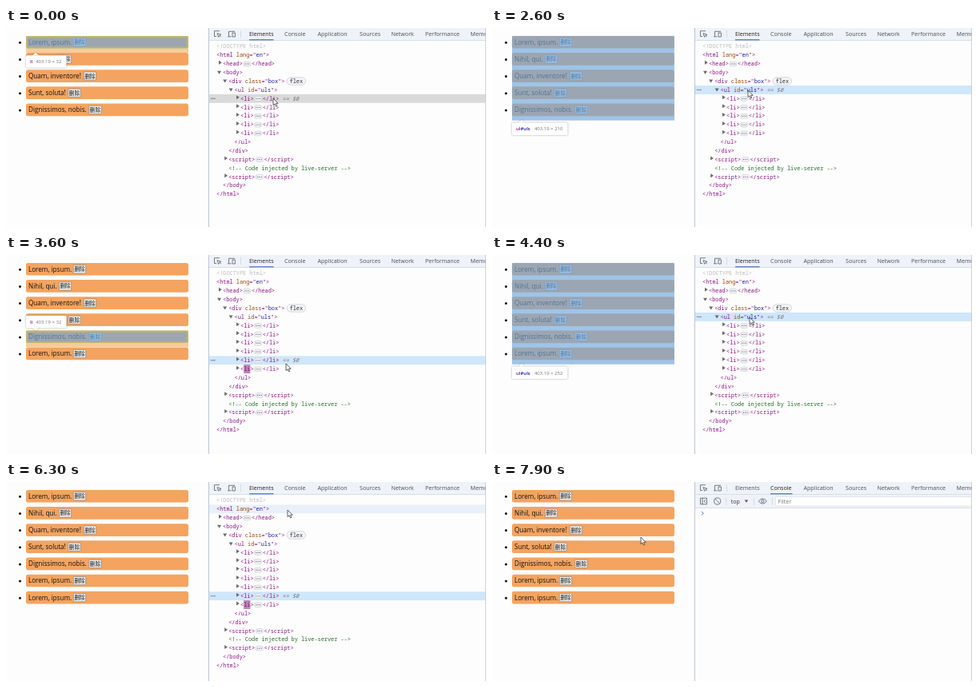
Write an HTML page that moves like this. It is 600 px wide and 249 px high and loops after 8 s.

```html
<!DOCTYPE html>
<html lang="en">
<head>
<meta charset="utf-8">
<title>Copying list items in the element tree</title>
<style>
html, body { margin: 0; width: 100%; height: 100%; overflow: hidden; background: #fefdfe; }
svg { display: block; width: 600px; height: 249px; }
text { white-space: pre; }
.page { font: 8.15px "Open Sans", "Noto Sans", sans-serif; fill: #111; }
.btn { font: 6.7px "Noto Sans CJK SC", "Noto Sans CJK", sans-serif; fill: #111; }
.ui { font: 7.1px "Open Sans", "Noto Sans", sans-serif; fill: #4b4f55; }
.tip { font: 6px "Open Sans", "Noto Sans", sans-serif; fill: #737373; }
.code { font: 6.89px "Noto Sans Mono", "DejaVu Sans Mono", monospace; fill: #881280; }
.code .attr { fill: #994500; }
.code .val { fill: #1a1aa6; }
.code .type { fill: #bdbdbd; }
.code .note { fill: #236e25; }
.code .ref { fill: #777; font-style: italic; }
.line { fill: none; stroke: #565b61; stroke-width: .8; }
</style>
</head>
<body>
<svg viewBox="0 0 600 249">
  <g id="page"></g>
  <g id="tools"></g>
  <path id="cursor" d="M0 0V8.6L2 6.8L3.4 9.9L4.8 9.3L3.5 6.3H6.1Z" fill="#fff" stroke="#222" stroke-width=".7"/>
</svg>
<script>
const LOOP = 8000, STEP = 100;
const CHAR = 4.134, ROW = 10.875, TOP = 17.6;
const ITEM = 21.15, FIRST = 9.9, LEFT = 25, WIDE = 203;
const $ = id => document.getElementById(id);

// [time, x, y] of the pointer tip
const PATH = [
  [0, 334, 88], [1300, 334, 88], [1700, 321, 78], [2000, 320, 78],
  [2600, 320, 78], [3000, 325, 77], [3200, 335, 96], [3500, 350, 136],
  [3600, 350, 136], [3800, 345, 100], [4000, 339, 56], [4300, 322, 78],
  [5200, 322, 78], [5500, 324, 76], [5800, 328, 75], [6000, 338, 68],
  [6300, 352, 35], [6400, 357, 29], [6500, 362, 19], [6800, 363, 9],
  [7200, 362, 9], [7500, 325, 38], [7800, 267, 79], [7900, 186, 69], [LOOP, 186, 69]
];

// [from, value]: the last entry already begun applies
const SELECTED = [[0, 'li0'], [1800, 'ul'], [2800, '/ul'], [3100, 'li4'],
  [4400, 'ul'], [5400, '/ul'], [5700, 'li5']];
const ITEMS = [[0, 5], [2800, 6], [5400, 7]];
const NODES = [[0, 5], [3100, 6], [5700, 7]];
const FLASH = [[0, 0], [3100, 1], [4400, 0], [5700, 1], [6900, 0]];
const OVERLAY = [[0, 1], [2800, 0], [3400, 1], [5400, 0], [6400, 1]];
const CONSOLE = [[0, 0], [7100, 1]];

const at = (list, t) => list.filter(e => e[0] <= t).pop()[1];

function pointer(t) {
  const i = PATH.findIndex(p => p[0] > t);
  const [t0, x0, y0] = PATH[i - 1], [t1, x1, y1] = PATH[i];
  const k = (t - t0) / (t1 - t0);
  return [x0 + (x1 - x0) * k, y0 + (y1 - y0) * k];
}

const esc = s => s.replace(/</g, '&lt;').replace(/>/g, '&gt;');
const rect = (x, y, w, h, fill, more = '') =>
  `<rect x="${x}" y="${y}" width="${w}" height="${h}" fill="${fill}" ${more}/>`;
const text = (cls, x, y, s, more = '') => `<text class="${cls}" x="${x}" y="${y}" ${more}>${s}</text>`;
const path = (d, more = 'class="line"') => `<path d="${d}" ${more}/>`;
const span = (cls, s) => `<tspan class="${cls}">${esc(s)}</tspan>`;

// Page

const WORDS = [['Lorem, ipsum.', 84], ['Nihil, qui.', 66], ['Quam, inventore!', 97],
  ['Sunt, soluta!', 77.5], ['Dignissimos, nobis.', 103.5]];

function item(i) {
  const y = FIRST + ITEM * i, [words, bx] = WORDS[i % 5 === i ? i : 0];
  return `<circle cx="17.5" cy="${y + 8.4}" r="1.5" fill="#111"/>` +
    rect(LEFT, y, WIDE, 15.7, '#f4a460', 'rx="2.5"') +
    text('page', 28, y + 10.7, words) +
    rect(bx + .3, y + 2.8, 15.4, 10.2, '#efefef', 'rx="1" stroke="#767676" stroke-width=".6"') +
    text('btn', bx + 1.3, y + 10.3, '删除');
}

const BLUE = 'rgba(111,168,220,.66)', GREEN = 'rgba(147,196,125,.55)', ORANGE = 'rgba(246,178,107,.66)';

function tip(x, y, w, down, name, id, size) {
  const ay = down ? y + 15.5 : y, d = down ? 3.5 : -3.5;
  const nameWidth = w - size.length * 3.3 - 9;
  return `<g filter="drop-shadow(0 .5px 1px rgba(0,0,0,.35))">` +
    rect(x, y, w, 15.5, '#fff', 'rx="1.2"') +
    path(`M${x + 8} ${ay}l4 ${d}l4 ${-d}z`, 'fill="#fff"') + '</g>' +
    text('tip', x + 5, y + 9.9, `<tspan fill="#881280" font-weight="600">${name}</tspan>` +
      `<tspan fill="#1a1aa6" font-weight="600">${id}</tspan>`) +
    text('tip', x + 7 + nameWidth, y + 9.9, size);
}

function overlay(id, count) {
  if (/^li/.test(id)) {
    const i = +id.slice(2), y = FIRST + ITEM * i, p = 2.3;
    const ring = `M${LEFT} ${y}h${WIDE}v16h${-WIDE}zM${LEFT + p} ${y + p}v${16 - 2 * p}h${WIDE - 2 * p}v${2 * p - 16}z`;
    return path(ring, `fill="${GREEN}"`) +
      rect(LEFT + p, y + p, WIDE - 2 * p, 16 - 2 * p, BLUE) +
      rect(LEFT, y + 16, WIDE, 5.1, ORANGE) +
      tip(LEFT, i ? y - 18.7 : y + 24.3, 50.5, i > 0, 'li', '', '403.19 × 32');
  }
  const h = ITEM * count;
  if (/ul$/.test(id))
    return rect(LEFT, FIRST, WIDE, h, BLUE) +
      tip(LEFT, FIRST + h + 2.8, 69.5, false, 'ul', '#uls', `403.19 × ${count * 42}`);
  if (/div$/.test(id))
    return rect(0, 0, 253, FIRST * 2 + h, BLUE) +
      rect(LEFT, FIRST, WIDE, h, ORANGE, 'opacity=".2"') +
      tip(2, FIRST * 2 + h + 3, 69.5, false, 'div', '.box', `502 × ${count * 42 + 40}`);
  if (/body$|html$/.test(id)) return rect(0, 0, 253, 249, BLUE);
  return '';
}

// Element tree

const tag = (id, x, open, s, close = '') => ({ id, x, open, s, close });

function rows(count) {
  const attr = (el, name, val) =>
    esc('<' + el) + span('attr', ' ' + name) + esc('="') + span('val', val) + esc('">');
  const folded = (id, x, el) => tag(id, x, 0, `<${el}>`, `</${el}>`);
  const plain = (id, x, html, open) => ({ id, x, html, open });
  const items = Array.from({ length: count }, (_, i) => folded('li' + i, 293, 'li'));
  return [
    plain('doctype', 263, span('type', '<!DOCTYPE html>')),
    plain('html', 263, attr('html', 'lang', 'en')),
    folded('head', 271, 'head'),
    plain('body', 271, esc('<body>'), 1),
    plain('div', 278.2, attr('div', 'class', 'box'), 1),
    plain('ul', 285.6, attr('ul', 'id', 'uls'), 1),
    ...items,
    plain('/ul', 285.6, esc('</ul>')),
    plain('/div', 278.2, esc('</div>')),
    folded('script', 278.2, 'script'),
    plain('note', 278.2, span('note', '<!-- Code injected by live-server -->')),
    folded('script2', 278.2, 'script'),
    plain('/body', 271, esc('</body>')),
    plain('/html', 263, esc('</html>'))
  ];
}

const dots = (x, y, gap, r, fill) => [0, 1, 2].map(i =>
  `<circle cx="${x + i * gap}" cy="${y}" r="${r}" fill="${fill}"/>`).join('');

function drawRow(r, i, s) {
  const y = TOP + ROW * i, base = y + 7.8, mid = y + 5.4;
  const selected = r.id === s.selected;
  let out = '', end = r.x;
  if (selected) out += rect(254, y, 346, ROW, s.t < 100 ? '#dadada' : '#cfe6fb') + dots(256.7, mid, 2.1, .65, '#555');
  else if (i === s.hover) out += rect(254, y, 346, ROW, '#e9f0fa');
  if (r.open === 1) out += path(`M${r.x - 7} ${mid - 2}h5l-2.5 4z`, 'fill="#6a6a6a"');
  if (r.open === 0) out += path(`M${r.x - 5} ${mid - 4}v5l3.8 -2.5z`, 'fill="#6a6a6a"');
  if (r.s) {
    if (s.flash && r.id === 'li' + (s.nodes - 1)) out += rect(r.x + CHAR, y, 2 * CHAR, ROW, '#b886b3');
    const bx = r.x + r.s.length * CHAR + .8;
    end = bx + 10.4 + r.close.length * CHAR;
    out += text('code', r.x, base, esc(r.s)) +
      rect(bx, mid - 2.7, 9.4, 5.8, '#f1f3f6', 'rx="2.6" stroke="#c3c6cb" stroke-width=".6"') +
      dots(bx + 2.4, mid + .2, 2.3, .6, '#555') +
      text('code', bx + 10.4, base, esc(r.close));
  } else {
    end += r.html.replace(/<[^>]*>/g, '').replace(/&..;/g, '.').length * CHAR;
    out += text('code', r.x, base, r.html);
  }
  if (r.id === 'div')
    out += rect(351, mid - 4.7, 23.5, 9.4, '#f5f6f8', 'rx="4.7" stroke="#c3c6cb" stroke-width=".7"') +
      text('code', 354.6, base, 'flex', 'style="fill:#333"');
  if (selected) out += text('code', end + CHAR, base, span('ref', '== $0'));
  return out;
}

// Panels

const TABS = [['Elements', 304, 30.5], ['Console', 348, 27.5], ['Application', 389.5, 38], ['Sources', 442, 25],
  ['Network', 481.5, 28.5], ['Performance', 524, 42], ['Memory', 580.5, 28]];

function toolbar(s) {
  const active = s.console ? 1 : 0, [, ux, uw] = TABS[active];
  let out = rect(254, 0, 346, 15.5, '#eff3f9');
  if (s.y < 15 && s.x > 341 && s.x < 382) out += rect(341, 0, 41, 15, '#e0e6ef');
  out += rect(254, 15.2, 346, .7, '#cbd5e4') + rect(ux, 14.2, uw, 1.2, '#476fb5');
  out += path('M267 3.7h-6.5v6.8h2.6M264 6.6l5 1.8l-2 .8l1.7 1.9M264 6.6l1.7 4.8l1 -2');
  out += path('M278.5 10.3v-6h7.6M277 10.8h4.6M283 6h3.4v5h-3.4z') + rect(293, 3, .7, 9, '#cbd0d8');
  return out + TABS.map(([name, x], i) =>
    text('ui', x, 10, name, i === active ? 'style="fill:#1f1f1f"' : '')).join('');
}

function consolePanel() {
  const bar = x => rect(x, 19.5, .7, 9.5, '#cbd0d8');
  return rect(254, 16, 346, 16, '#eff3f9') + rect(254, 32, 346, .7, '#cbd5e4') +
    path('M260.5 20.2h8v7.6h-8zM263 20.2v7.6M267 22.2l-2.2 1.8l2.2 1.8') +
    path('M285.8 24a4.1 4.1 0 1 1-8.2 0a4.1 4.1 0 1 1 8.2 0M278.8 21.1l5.8 5.8') +
    bar(292.5) + text('ui', 298.8, 26.6, 'top', 'style="fill:#333"') +
    path('M315.6 22.6h4.6l-2.3 3.2z', 'fill="#555"') + bar(327) +
    path('M333.2 24q5-6.4 10.2 0q-5.2 6.4-10.2 0M339.9 24a1.6 1.6 0 1 1-3.2 0a1.6 1.6 0 1 1 3.2 0') +
    bar(350) + rect(354.5, 18.5, 246, 11.5, '#fff', 'rx="1.5" stroke="#d4dae3" stroke-width=".6"') +
    text('ui', 357.5, 26.8, 'Filter', 'style="fill:#777"') +
    path('M262 36.9l2.3 2.3l-2.3 2.3', 'fill="none" stroke="#3b78d8" stroke-width="1"');
}

let last = -1;

function draw(t) {
  const [x, y] = pointer(t);
  const s = { t, x, y, selected: at(SELECTED, t), nodes: at(NODES, t), flash: at(FLASH, t), console: at(CONSOLE, t) };
  const tree = rows(s.nodes), count = at(ITEMS, t);
  s.hover = x > 254 && !s.console ? Math.floor((y - TOP) / ROW) : -1;
  const over = tree[s.hover];

  $('page').innerHTML = Array.from({ length: count }, (_, i) => item(i)).join('') +
    (over && at(OVERLAY, t) ? overlay(over.id, count) : '');
  $('tools').innerHTML = rect(253, 0, 347, 249, '#fefdfe') +
    (s.console ? consolePanel() : tree.map((r, i) => drawRow(r, i, s)).join('')) +
    toolbar(s) + rect(253, 0, .9, 249, '#b5bfcd') + rect(599.2, 0, .8, 249, '#c4c8ce');
  $('cursor').setAttribute('transform', `translate(${x} ${y})`);
}

function tick() {
  const t = Math.floor(performance.now() % LOOP / STEP) * STEP;
  if (t !== last) draw(last = t);
  requestAnimationFrame(tick);
}
tick();
</script>
</body>
</html>
```
